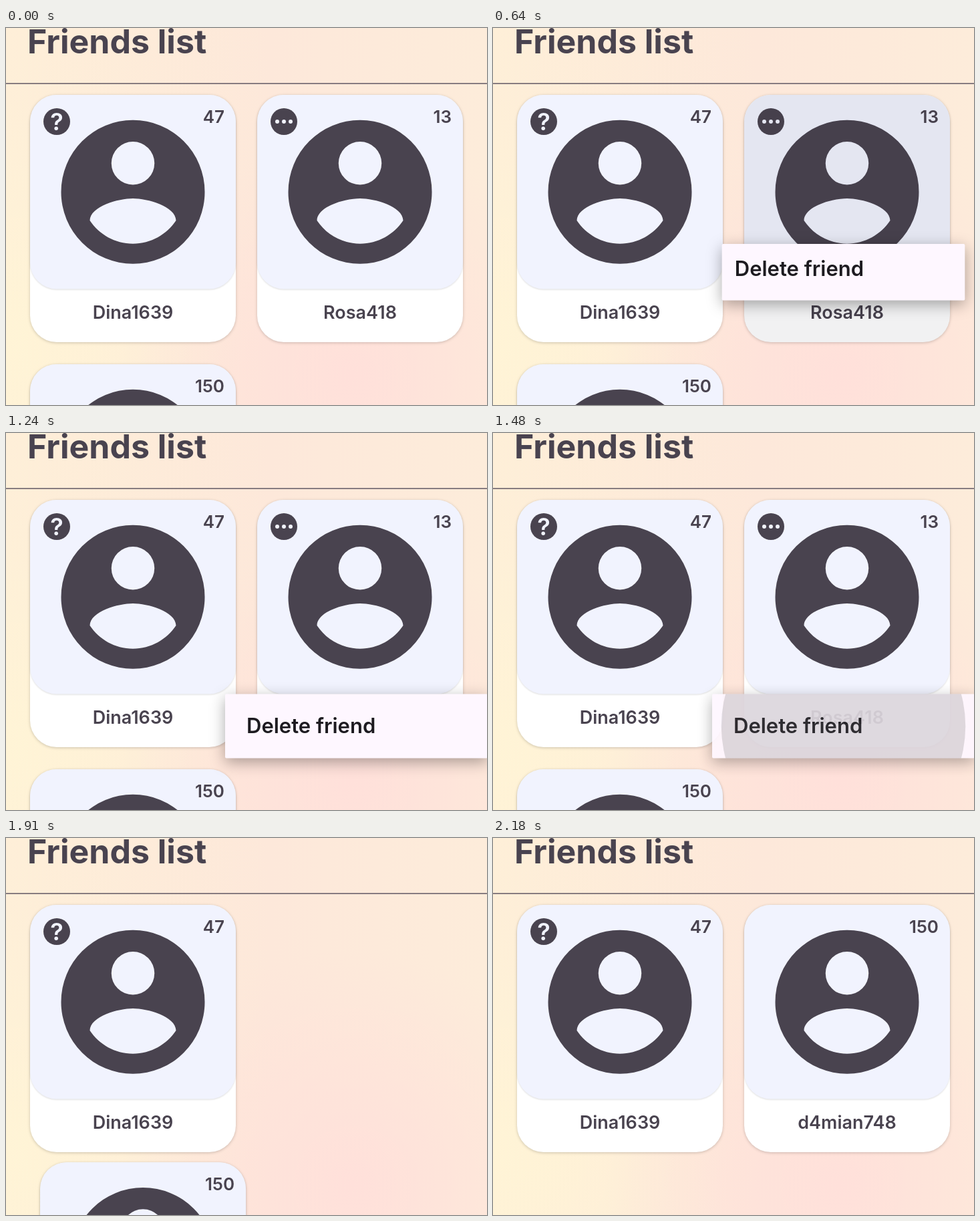
An HTML page that plays this animation: 720 by 564 pixels, repeating every 2.21 s.

```html
<!DOCTYPE html>
<html lang="en">
<head>
<meta charset="utf-8">
<title>Friends list</title>
<style>
html, body { margin: 0; width: 100%; height: 100%; overflow: hidden; }
body {
  background:
    radial-gradient(circle at 72% 92%, #ffe0da 0, #ffe0da00 48%),
    radial-gradient(circle at 0 82%, #fff4d6 0, #fff4d600 42%),
    linear-gradient(90deg, #feefd8 0, #fde8da 55%, #fdecda 100%);
}
svg { display: block; width: 100vw; height: 100vh; }
text { font-family: Inter, Roboto, sans-serif; font-weight: 600; fill: #49434f; }
.title { font-size: 50px; font-weight: 700; }
.name { font-size: 27px; text-anchor: middle; }
.count { font-size: 26px; text-anchor: end; }
.help { font-size: 36px; text-anchor: middle; fill: #f1f3fe; }
.item { font-size: 31px; fill: #1d1b20; }
.dark { fill: #49434f; }
.pale { fill: #f1f3fe; }
.base { fill: #fff; filter: drop-shadow(0 1px 2px #0003); }
.top { filter: drop-shadow(0 1px 1px #0002); }
.sheet { fill: #fef7ff; filter: drop-shadow(0 6px 11px #0005); }
.ripple { fill: #1d1b20; }
</style>
</head>
<body>
<svg viewBox="0 0 720 564">
  <defs>
    <clipPath id="cardClip"><rect width="308" height="370" rx="40"/></clipPath>
    <clipPath id="menuClip"><rect x="328" y="390.5" width="393" height="96" rx="2"/></clipPath>
    <path id="avatar" class="dark" fill-rule="evenodd" transform="translate(25 16.3) scale(10.75)"
      d="M12 2a10 10 0 1 0 0 20a10 10 0 1 0 0-20z
         M12 5a3 3 0 1 1 0 6a3 3 0 1 1 0-6z
         M12 19.2c-2.5 0-4.71-1.28-6-3.22c.03-1.99 4-3.08 6-3.08s5.97 1.09 6 3.08c-1.29 1.94-3.5 3.22-6 3.22z"/>
  </defs>
  <text class="title" x="32" y="38">Friends list</text>
  <rect y="82.3" width="720" height="1.6" fill="#6b626b"/>
  <g id="cards"></g>
  <g id="menu">
    <rect id="sheet" class="sheet" rx="2"/>
    <g clip-path="url(#menuClip)"><circle id="menuRipple" class="ripple" cx="524.5" cy="438.5"/></g>
    <text id="item" class="item">Delete friend</text>
  </g>
</svg>
<script>
const LOOP = 2210;
const $ = id => document.getElementById(id);
const set = (id, attrs) => {
  for (const key in attrs) $(id).setAttribute(key, attrs[key]);
};
const mix = (a, b, p) => a + (b - a) * p;
const span = (t, start, length) => Math.min(1, Math.max(0, (t - start) / length));

// Cubic bezier (.4, 0, .2, 1), solved by bisection.
function ease(x) {
  let low = 0, high = 1, s = 0.5;
  for (let i = 0; i < 24; i++) {
    s = (low + high) / 2;
    const q = 1 - s;
    if (1.2 * q * q * s + 0.6 * q * s * s + s ** 3 < x) low = s;
    else high = s;
  }
  return 3 * (1 - s) * s * s + s ** 3;
}

const dots = [30, 40, 50].map(x => `<circle class="pale" cx="${x}" cy="40" r="3"/>`).join("");
const help = `<text class="help" x="40" y="53">?</text>`;

function card(id, x, y, name, count, icon) {
  const badge = icon ? `<circle class="dark" cx="40" cy="40" r="20"/>${icon}` : "";
  return `<g id="${id}" transform="translate(${x} ${y})">
    <rect class="base" width="308" height="370" rx="40"/>
    <rect class="pale top" width="308" height="290.5" rx="40"/>
    <use href="#avatar"/>${badge}
    <text class="count" x="291" y="42">${count}</text>
    <text class="name" x="154" y="335">${name}</text>
    <g clip-path="url(#cardClip)"><circle id="${id}Ripple" class="ripple" r="0"/></g>
  </g>`;
}

$("cards").innerHTML =
  card("first", 36, 100, "Dina1639", 47, help) +
  card("second", 376, 100, "Rosa418", 13, dots) +
  card("third", 36, 503, "d4mian748", 150, "");

function draw(t) {
  // Long press on the second card
  const press = ease(span(t, 120, 225));
  set("secondRipple", {
    cx: mix(257, 154, press),
    cy: mix(288, 185, press),
    r: mix(111, 261, press),
    opacity: 0.1 * span(t, 120, 75) * (1 - span(t, 580, 150))
  });
  set("second", { visibility: t < 1790 ? "visible" : "hidden" });

  // Menu opens, is tapped, fades
  const open = ease(span(t, 580, 195));
  const w = 393 * mix(0.875, 1, open);
  const h = 96 * mix(0.8, 1, open);
  set("sheet", {
    x: 524.5 - w / 2,
    y: mix(316, 438.5, open) - h / 2,
    width: w,
    height: h
  });
  set("item", { x: mix(363, 360, open), y: mix(318, 449, open) });
  set("menuRipple", {
    r: mix(118, 222, ease(span(t, 1390, 225))),
    opacity: 0.15 * span(t, 1390, 75)
  });
  set("menu", { opacity: span(t, 570, 30) * (1 - span(t, 1475, 75)) });

  // Third card takes the free place
  const move = ease(span(t, 1873, 300));
  set("third", { transform: `translate(${mix(36, 376, move)} ${mix(503, 100, move)})` });
}

const begin = performance.now();
function frame() {
  draw((performance.now() - begin) % LOOP);
  requestAnimationFrame(frame);
}
frame();
</script>
</body>
</html>
```
